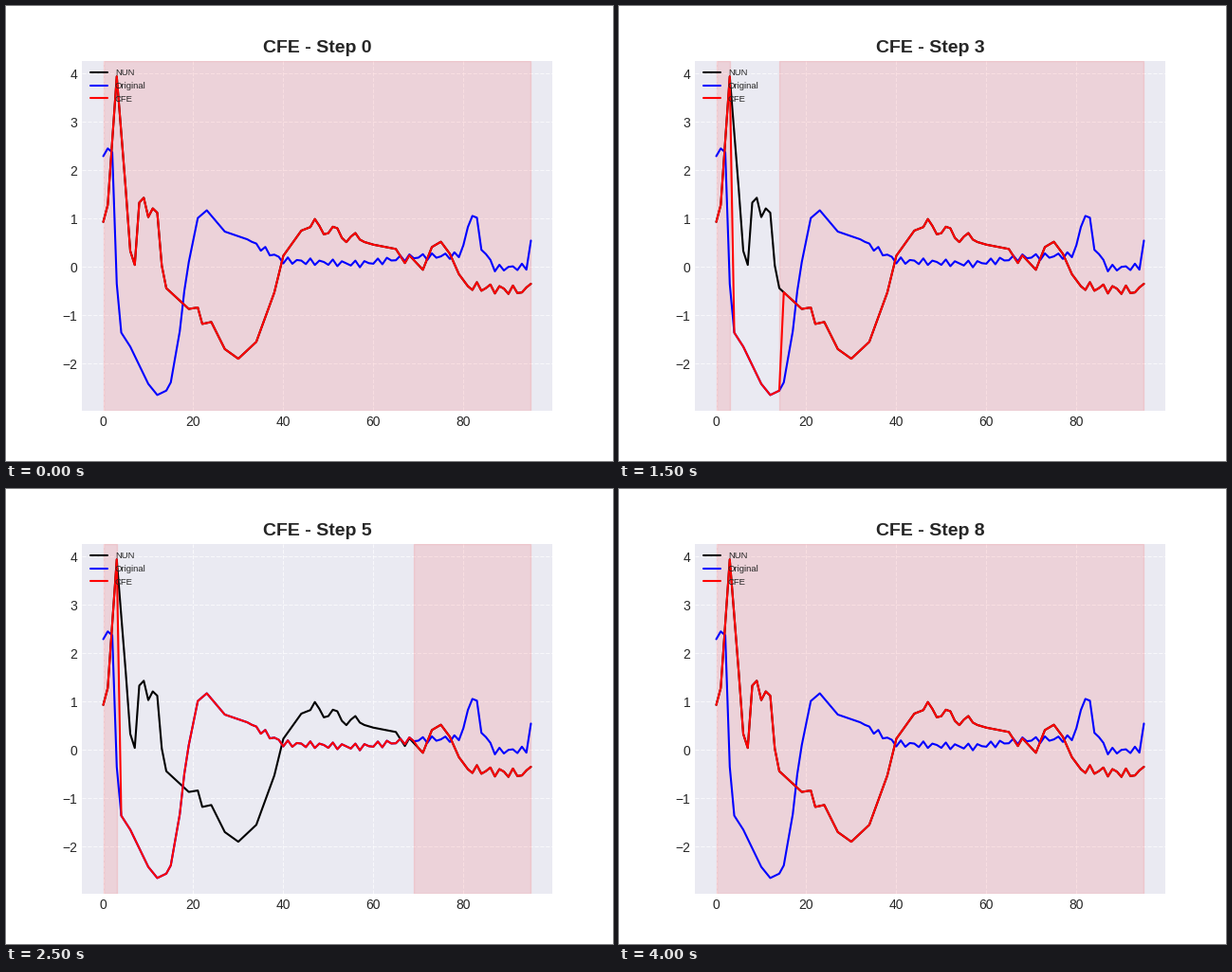
Animation of 640x480 px, one loop 4.5 s. Source, as a matplotlib script:

```python
import numpy as np
import matplotlib.pyplot as plt
from matplotlib.animation import FuncAnimation

plt.rcParams.update({
    "font.family": "Liberation Sans",
    "text.color": ".15",
    "axes.facecolor": "#EAEAF2",
    "axes.linewidth": 0,
    "axes.axisbelow": True,
    "grid.color": "white",
    "xtick.color": ".15",
    "ytick.color": ".15",
    "xtick.major.size": 0,
    "ytick.major.size": 0,
    "legend.frameon": False,
    "lines.solid_capstyle": "round",
})

LAST = 95
STEPS = 9
x = np.arange(LAST + 1)


def trend(*points):
    """Straight segments through a few (x, y) key points."""
    return np.interp(x, *zip(*points))


def wave(period, peak, lo=0, hi=LAST):
    """Cosine with a crest at `peak`, zero outside lo..hi."""
    return np.cos(2 * np.pi * (x - peak) / period) * ((x >= lo) & (x <= hi))


query = trend(
    (0, 2.29), (1, 2.45), (2, 2.37), (3, -.35), (4, -1.36), (6, -1.65),
    (10, -2.42), (12, -2.65), (14, -2.56), (15, -2.39), (17, -1.33),
    (18, -.5), (19, .1), (21, 1.01), (23, 1.17), (27, .73), (32, .57),
    (34, .45), (40, .13), (57, .06), (68, .2), (79, .24), (80, .45),
    (82, 1.12), (83, .95), (84, .4), (87, -.03), (94, 0), (95, .52))
# Zigzag whose phase flips with a slow beat
query += 0.07 * wave(2, 41, lo=33) * wave(10.4, 41)

nun = trend(
    (0, .93), (1, 1.28), (3, 3.94), (5, 1.6), (6, .33), (7, .04),
    (8, 1.33), (9, 1.43), (10, 1.03), (11, 1.21), (12, 1.12), (13, .03),
    (14, -.44), (19, -.87), (21, -.84), (22, -1.18), (24, -1.14),
    (27, -1.7), (30, -1.9), (34, -1.55), (38, -.53), (40, .23), (44, .75),
    (47, .86), (56, .57), (60, .46), (65, .37), (67, .08), (68, .24),
    (71, -.06), (73, .41), (75, .52), (77, .27), (79, -.15), (81, -.4),
    (93, -.5), (95, -.35))
nun += 0.13 * wave(4.5, 47, 47, 57) + 0.1 * wave(2.7, 83, 82, 93)

# Replaced segments, repeating every four steps
CYCLE = [
    [(0, LAST)],
    [(0, 3), (69, LAST)],
    [(0, 3), (14, 67), (69, LAST)],
    [(0, 3), (14, LAST)],
]

fig, ax = plt.subplots(figsize=(6.4, 4.8), dpi=100)


def counterfactual(spans):
    mask = x == 0
    for lo, hi in spans:
        mask |= (x > lo) & (x <= hi)
    return np.where(mask, nun, query)


def draw(step):
    ax.clear()
    spans = CYCLE[step % len(CYCLE)]
    ax.plot(x, nun, color="black", label="NUN")
    ax.plot(x, query, color="blue", label="Original")
    ax.plot(x, counterfactual(spans), color="red", label="CFE")
    for lo, hi in spans:
        ax.axvspan(lo, hi, color="red", alpha=0.1)
    ax.set_xlim(-0.05 * LAST, 1.05 * LAST)
    ax.set_ylim(-2.98, 4.267)
    ax.grid(True, linestyle="--", alpha=0.7)
    ax.set_title(f"CFE - Step {step}", fontsize=14, fontweight="bold")
    ax.legend(loc="upper left", fontsize=6.8)
    return []


anim = FuncAnimation(fig, draw, frames=STEPS, init_func=lambda: draw(0),
                     interval=500, repeat=True, repeat_delay=0)
plt.show()
```
